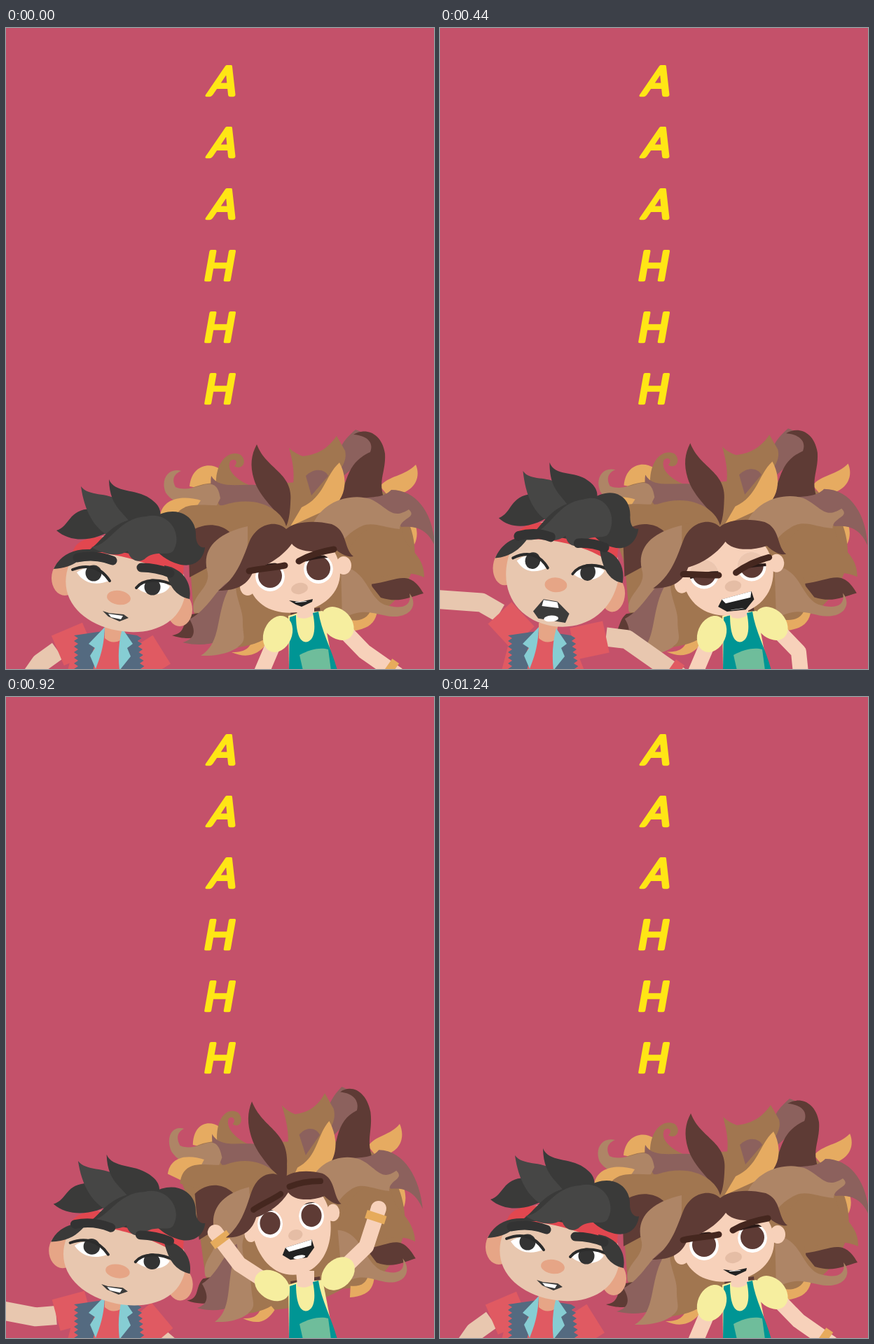
An HTML page for the animation above (1.28 s loop, 611 px wide and 916 px high).

```html
<!DOCTYPE html>
<html lang="en">
<head>
<meta charset="utf-8">
<title>Aaahhh</title>
<style>
html, body { margin: 0; width: 100%; height: 100%; overflow: hidden; background: #c4516a; }
svg { display: block; width: 100vw; height: 100vh; }
text { font: 400 57px Lato, sans-serif; text-anchor: middle; fill: #ffe615; stroke: #ffe615; stroke-width: 4.5; stroke-linejoin: round; }
.dk { fill: #3a3a39 } .lt { fill: #464645 } .skin { fill: #e8c7af } .ear { fill: #e6a586 } .red { fill: #e05a62 }
.d { fill: #5e3b35 } .m { fill: #8c615d } .b { fill: #a17650 } .l { fill: #ae8566 } .g { fill: #e6ab61 }
.face { fill: #f7d1ba } .teal { fill: #009594 } .yel { fill: #f6ee9f } .w { fill: #fff }
.brow { fill: none; stroke: #333; stroke-width: 13; stroke-linecap: round }
.brow2 { fill: none; stroke: #45271f; stroke-width: 9; stroke-linecap: round }
.lid { fill: none; stroke: #2b2b2b; stroke-width: 4; stroke-linecap: round }
</style>
</head>
<body>
<svg viewBox="0 0 611 916" preserveAspectRatio="none">
<rect width="611" height="916" fill="#c4516a"/>
<g id="title"></g>

<g id="mane">
  <path class="g" d="M262 655C265 625 290 620 305 630L312 665ZM534 655C545 640 570 640 585 624C594 645 580 668 545 668ZM553 690C585 690 592 720 583 738L560 720Z"/>
  <path class="b" d="M235 690C240 660 290 640 330 655C400 650 500 640 535 660C580 690 590 740 580 775C560 830 520 850 480 850C420 880 340 890 290 870C260 855 270 800 260 760Z"/>
  <path class="m" d="M499 574C480 590 465 610 476 645L522 606C524 590 512 578 499 574Z"/>
  <path class="d" d="M470 690C488 650 484 622 520 606C526 590 512 582 496 581C512 571 536 577 541 608C543 640 525 650 548 690L490 700Z"/>
  <path class="m" d="M470 690C500 660 530 680 550 660C590 660 611 700 612 740C600 712 580 712 565 713Z"/>
  <path class="b" d="M472 583C455 608 435 610 424 612C418 610 410 606 404 600C412 630 415 650 400 690L405 712L440 690C460 640 490 630 484 604Z"/>
  <path class="m" d="M428 640C440 628 455 630 460 640L436 668Z"/>
  <path class="g" d="M476 621C455 640 455 670 422 685L406 712L450 692C482 685 492 650 476 621Z"/>
  <path class="b" d="M300 655C298 620 318 602 335 610C346 620 336 633 326 626C333 620 326 613 320 619C314 632 330 648 355 656L310 668Z"/>
  <path class="m" d="M293 640C305 662 340 648 370 655C402 665 404 690 400 712C370 690 330 695 305 682C293 665 291 652 293 640Z"/>
  <path class="d" d="M358 595C372 632 412 635 406 680C405 700 402 708 400 712C388 690 362 672 354 645C348 625 350 610 358 595Z"/>
  <path class="l" d="M250 633C232 628 220 645 228 664C240 682 262 684 300 684L306 672C300 630 270 668 242 656C236 645 240 637 250 633Z"/>
  <path class="g" d="M220 695C226 670 255 668 278 675L255 710Z"/>
  <path class="b" d="M238 708C246 672 280 684 310 682C360 665 395 690 400 712C380 703 360 706 345 712C320 727 290 715 270 716Z"/>
  <path class="d" d="M260 722C285 702 318 708 330 735L290 770L262 785Z"/>
  <path class="l" d="M345 712C300 722 280 745 287 775C295 800 262 810 268 835C305 845 340 800 345 735Z"/>
  <path class="d" d="M237 868C258 865 250 850 264 838L310 830L300 855C290 872 258 876 237 868Z"/>
  <path class="m" d="M262 845C290 830 300 800 320 790L330 860C310 880 280 885 252 878C275 872 268 855 262 845Z"/>
  <path class="g" d="M322 892C345 892 350 885 356 862L372 880C360 895 345 902 322 892Z"/>
  <path class="l" d="M278 897C305 880 300 850 312 815C330 770 350 760 360 780L350 870C330 890 310 898 278 897Z"/>
  <path class="b" d="M338 770C315 800 340 825 338 850C338 870 345 875 330 885C380 880 400 850 405 820Z"/>
  <path class="g" d="M490 862C515 860 528 852 530 832L495 825Z"/>
  <path class="d" d="M520 795C560 790 575 772 596 808C575 814 560 822 535 814Z"/>
  <path class="b" d="M480 760C510 700 555 698 565 714C566 745 597 748 597 785C570 772 545 786 520 785C530 830 520 850 490 846L470 830Z"/>
  <path class="l" d="M478 770C515 772 515 812 540 824C565 832 580 826 576 808C588 822 580 842 552 841C530 840 510 825 480 845Z"/>
  <path class="l" d="M438 710C450 678 490 664 520 673C545 684 550 704 575 688C588 700 562 700 562 716C535 714 520 702 500 716C490 722 485 728 478 735Z"/>
</g>
<g id="girlArms"></g>
<g id="girlBody">
  <path class="d" d="M406 835L448 828L450 850H408Z"/>
  <path class="yel" d="M403 840L416 836L440 834L452 833L468 916H404Z"/>
  <path class="face" d="M414 820H440V838Q428 847 416 842Z"/>
  <path class="teal" d="M405 842L414 839C414 866 420 880 431 877C443 872 441 850 438 836L446 834C450 862 466 890 473 918H404Z"/>
  <path d="M419 896C435 887 450 885 460 888L464 918H424Z" fill="#6fbd9b"/>
</g>
<g id="puffs"></g>
<g id="girlHead">
  <ellipse class="face" cx="345" cy="798" rx="11" ry="13"/><ellipse class="face" cx="482" cy="768" rx="11" ry="13"/>
  <path id="girlFace" class="face" transform="translate(412 785) rotate(-10)"/>
  <g id="eyes"></g>
  <ellipse cx="419" cy="801" rx="12" ry="8" fill="#e5bda5" transform="rotate(-10 419 801)"/>
  <path id="girlMouth" fill="#222"/><path id="girlTeeth" class="w"/>
  <ellipse id="girlTongue" class="w" cx="425" cy="834" rx="10" transform="rotate(-8 425 834)"/>
  <path class="d" d="M400 716C385 702 358 708 347 735C337 760 330 785 303 804C330 804 346 796 354 774C375 768 396 754 408 737C416 748 440 752 468 743C478 752 488 757 496 755C482 745 488 718 465 709C440 703 412 705 400 716Z"/>
  <path id="girlBrowL" class="brow2" d="M347 776C365 772 380 772 398 768"/>
  <path id="girlBrowR" class="brow2" d="M418 762C435 752 450 748 468 745"/>
</g>

<g id="boyArms"></g>
<g id="boyBody">
  <path class="red" d="M102 864L188 872L206 918H88Z"/>
  <path id="vest" fill="#546a80"/>
  <path class="red" d="M138 866L168 866L164 918H124Z"/>
  <path class="ear" d="M141 850H169L165 874Q152 882 141 872Z"/>
  <path d="M141 856L118 880L127 886L120 897L128 916C134 900 140 885 141 856ZM166 858L181 880L173 886L178 898L162 918C160 900 160 880 166 858Z" fill="#86cdd3"/>
</g>
<g id="boyHead">
  <ellipse class="ear" cx="84" cy="786" rx="19" ry="25"/><ellipse class="ear" cx="248" cy="831" rx="18" ry="24"/>
  <path id="boyFace" class="skin" transform="translate(170 800) rotate(11)"/>
  <path class="w" d="M101 778C114 768 135 768 147 790C130 797 112 795 101 778ZM187 800C198 787 222 787 234 798C226 813 200 812 187 800Z"/>
  <circle cx="125" cy="779" r="11.5" fill="#333"/><circle cx="209" cy="799" r="11.5" fill="#333"/>
  <path class="lid" d="M95 774C112 767 133 767 148 790M186 800C196 787 220 786 241 797"/>
  <ellipse class="ear" cx="161" cy="814" rx="17" ry="10" transform="rotate(8 161 814)"/>
  <path id="boyMouth" fill="#3c3c3b"/><path id="boyTeeth" class="w"/>
  <ellipse id="boyTongue" class="w" cx="155" cy="860" rx="11"/>
  <path d="M95 752C98 722 150 720 200 742L254 765L252 792C200 756 130 744 92 752Z" fill="#e2474f"/>
  <path class="dk" d="M226 768C250 772 266 790 262 816C244 812 232 800 226 768Z"/>
  <path class="dk" d="M72 718C92 712 88 688 122 687C150 688 165 700 155 715C130 732 95 738 72 718Z"/>
  <path class="lt" d="M107 655C118 670 145 663 160 675C195 690 185 720 150 728C125 715 112 690 107 655Z"/>
  <path class="dk" d="M147 645C155 665 185 658 205 672C220 682 222 690 220 704L185 720C172 690 148 690 147 645Z"/>
  <path class="dk" d="M210 700C240 680 272 695 271 725C271 738 278 744 284 742C282 762 265 772 246 766C230 762 215 750 205 735Z"/>
  <path class="dk" d="M68 773C76 756 92 744 120 745C140 730 150 705 190 700L180 752C150 744 130 752 115 750C105 762 92 772 68 773Z"/>
  <path class="lt" d="M122 742C150 738 160 700 200 698C232 690 252 722 240 745C235 757 215 745 200 757C190 767 176 760 174 747C160 757 140 752 122 742Z"/>
  <path id="boyBrowL" class="brow" d="M100 757C118 753 135 755 150 761"/>
  <path id="boyBrowR" class="brow" d="M193 771C207 771 222 774 234 779"/>
</g>
</svg>
<script>
const LOOP = 1280, STEP = 40;
const $ = id => document.getElementById(id);
const set = (id, o) => { for (const k in o) $(id).setAttribute(k, o[k]); };

const ease = u => { u = Math.min(1, Math.max(0, u)); return u * u * (3 - 2 * u); };
// Rises from a to b, holds, falls from c to d.
const win = (t, a, b, c, d) => ease((t - a) / (b - a)) - ease((t - c) / (d - c));
const bump = (t, a, b, c) => win(t, a, b, b, c);
const mix = (a, b, k) => a.map((v, i) => v + (b[i] - v) * k);
const polar = ([x, y], deg, r) => [x + r * Math.cos(deg * Math.PI / 180), y + r * Math.sin(deg * Math.PI / 180)];

// Three points at rest and their shift at full stretch; squash is the reverse.
const parts = {
  boyHead: [[125, 779, 209, 799, 147, 645], [7, -17, 2, -20, 9, -23]],
  girlHead: [[377, 783, 446, 771, 399, 715], [0, -31, -10, -31, -4, -28]],
  mane: [[358, 595, 585, 624, 280, 897], [-7, -17, -23, -14, 20, -4]]
};

function affine(p, q) {
  const [a, b, c, d] = [p[2] - p[0], p[3] - p[1], p[4] - p[0], p[5] - p[1]];
  const [e, f, g, h] = [q[2] - q[0], q[3] - q[1], q[4] - q[0], q[5] - q[1]];
  const det = a * d - b * c;
  const m = [(e * d - g * b) / det, (f * d - h * b) / det, (g * a - e * c) / det, (h * a - f * c) / det];
  return `matrix(${[...m, q[0] - m[0] * p[0] - m[2] * p[1], q[1] - m[1] * p[0] - m[3] * p[1]].join(' ')})`;
}
function stretch(id, s) {
  const [rest, shift] = parts[id];
  set(id, { transform: affine(rest, rest.map((v, i) => v + shift[i] * s)) });
}

const poly = p => 'M' + p.map(v => v.toFixed(2)).join(' ') + 'Z';
const line = (p, w, color) =>
  `<path d="M${p.flat().join(' ')}" fill="none" stroke="${color}" stroke-width="${w}" stroke-linejoin="round"/>`;

// Shoulder, upper angle and length, lower angle and length.
function limb(from, up, upLen, low, lowLen, w, skin, band, size) {
  const elbow = polar(from, up, upLen), hand = polar(elbow, low, lowLen);
  return line([from, elbow, hand], w, skin) +
    `<circle cx="${hand[0]}" cy="${hand[1]}" r="${w / 2}" fill="${skin}"/>` +
    line([polar(hand, low, -size - 5), polar(hand, low, -7)], w + 7, band);
}
function boyArm(root, sleeve, low, raise) {
  const end = polar(root, sleeve, 48);
  return limb(end, sleeve * .6 + low * .4, 30, low, 70 + 26 * Math.sin(Math.PI * raise), 27, '#e8c7af', '#e05a62', 17) +
    line([root, end], 46, '#e05a62');
}
const girlArm = (from, up, low) => limb(from, up, 56, low, 57, 22, '#f7d1ba', '#e6ab5c', 14);
const puff = ([x, y], deg) =>
  `<ellipse class="yel" rx="27" ry="20" transform="translate(${x} ${y}) rotate(${deg})"/>`;

function face(id, r, top, chin) {
  const k = chin * .6;
  set(id, { d: `M${-r} -5A${r} ${top} 0 0 1 ${r} -5C${r} ${k} ${r * .55} ${chin} 0 ${chin}S${-r} ${k} ${-r} -5Z` });
}

function build() {
  $('title').innerHTML = [...'AAAHHH'].map((ch, i) => {
    const [x, skew] = ch === 'A' ? [306, -16] : [302, -10];
    return `<text transform="translate(${x} ${96 + 88 * i}) skewX(${skew})">${ch}</text>`;
  }).join('');
  $('eyes').innerHTML = [[377, 784], [446, 773]].map(([x, y], i) =>
    `<clipPath id="eye${i}"><circle cx="${x}" cy="${y}" r="21"/></clipPath>
    <g clip-path="url(#eye${i})"><circle class="w" cx="${x}" cy="${y}" r="21"/>
    <circle class="d" cx="${x}" cy="${y - 1}" r="17"/>
    <g transform="translate(${x} ${y}) rotate(-10)"><path id="lid${i}" fill="#ecc6af" stroke="#2b1a17" stroke-width="4"/></g></g>`).join('');
  const zig = (x, dx) => Array.from({ length: 14 }, (_, i) => `${x + i * dx + (i % 2) * 6} ${868 + i * 4}`);
  set('vest', { d: `M${zig(97, 0).join('L')}L130 918L124 890L138 862ZM${zig(187, .4).join('L')}L160 918L168 865Z` });
}

function drawBoy(t) {
  const s = 1.05 * win(t, 200, 420, 780, 900) - .6 * bump(t, 0, 160, 330) - .38 * win(t, 820, 920, 1040, 1230);
  const open = Math.max(0, s), lift = -13 * win(t, 300, 430, 880, 1010);
  stretch('boyHead', s);
  face('boyFace', 86, 72, 62 + 9 * open);
  set('boyMouth', { d: poly(mix([138, 833, 147, 836, 168, 838, 175, 843, 162, 848, 146, 841], [128, 848, 143, 833, 164, 837, 182, 854, 176, 866, 136, 858], open)) });
  set('boyTeeth', { d: poly(mix([146, 837, 167, 840, 164, 845, 150, 842], [143, 834, 164, 838, 166, 846, 141, 842], open)) });
  set('boyTongue', { ry: 4 * open });
  set('boyBrowL', { transform: `translate(2 ${lift})` });
  set('boyBrowR', { transform: `translate(0 ${lift})` });

  const sleeve = 70 * win(t, 280, 430, 770, 960), raise = win(t, 310, 580, 790, 1060);
  $('boyArms').innerHTML = boyArm([118, 871], 157 + sleeve, 125 + 125 * raise, raise) +
    boyArm([190, 880], 58 - sleeve, 115 - 169 * raise, raise);
}

function drawGirl(t) {
  const s = win(t, 420, 520, 940, 1020) + .5 * bump(t, 440, 520, 600)
    - .6 * win(t, 0, 160, 260, 440) - .45 * win(t, 960, 1040, 1060, 1250);
  const up = Math.max(0, s), open = win(t, 300, 460, 1010, 1200), blink = bump(t, 260, 430, 560);
  const wide = win(t, 450, 570, 980, 1180), brow = wide - .6 * blink;
  stretch('mane', s);
  stretch('girlHead', Math.max(s, .2 * s));
  face('girlFace', 66, 64, 50 + 6 * open + 20 * up);
  set('girlMouth', { d: poly(mix([404, 818, 420, 820, 438, 816, 437, 820, 422, 827, 414, 824], [397, 831, 402, 820, 446, 808, 450, 820, 438, 835, 410, 838], open)) });
  set('girlTeeth', { d: poly(mix([412, 820, 430, 819, 428, 820, 414, 821], [402, 820, 446, 808, 445, 817, 408, 826], open)) });
  set('girlTongue', { ry: 4 * up / 1.5 });
  const lid = -21 + 42 * (.12 * (1 - wide) + .38 * blink);
  for (const i of [0, 1]) set('lid' + i, { d: `M-26 -26H26V${lid + 2}Q0 ${lid - 3} -26 ${lid + 2}Z` });
  set('girlBrowL', { transform: `translate(0 ${-21 * brow}) rotate(${-18 * brow} 372 772)` });
  set('girlBrowR', { transform: `translate(${-7 * brow} ${-29 * brow}) rotate(${10 * brow} 443 753)` });

  const raise = win(t, 440, 700, 930, 1200), sway = 18 * Math.min(0, s);
  const left = mix([388, 866], [380, 841], raise), right = mix([473, 851], [474, 824], raise);
  const upL = 113 + 100 * raise, upR = 46 - 90 * raise + sway;
  $('girlArms').innerHTML = girlArm(left, upL, 112 + 121 * raise) +
    girlArm(right, upR, 35 - 107 * raise + 50 * blink + sway / 2);
  $('puffs').innerHTML = puff(left, upL) + puff(right, upR);
}

build();
const start = performance.now();
let last = -1;
function tick() {
  const t = Math.floor((performance.now() - start) % LOOP / STEP) * STEP;
  if (t !== last) {
    last = t;
    drawBoy(t);
    drawGirl(t);
  }
  requestAnimationFrame(tick);
}
tick();
</script>
</body>
</html>
```
